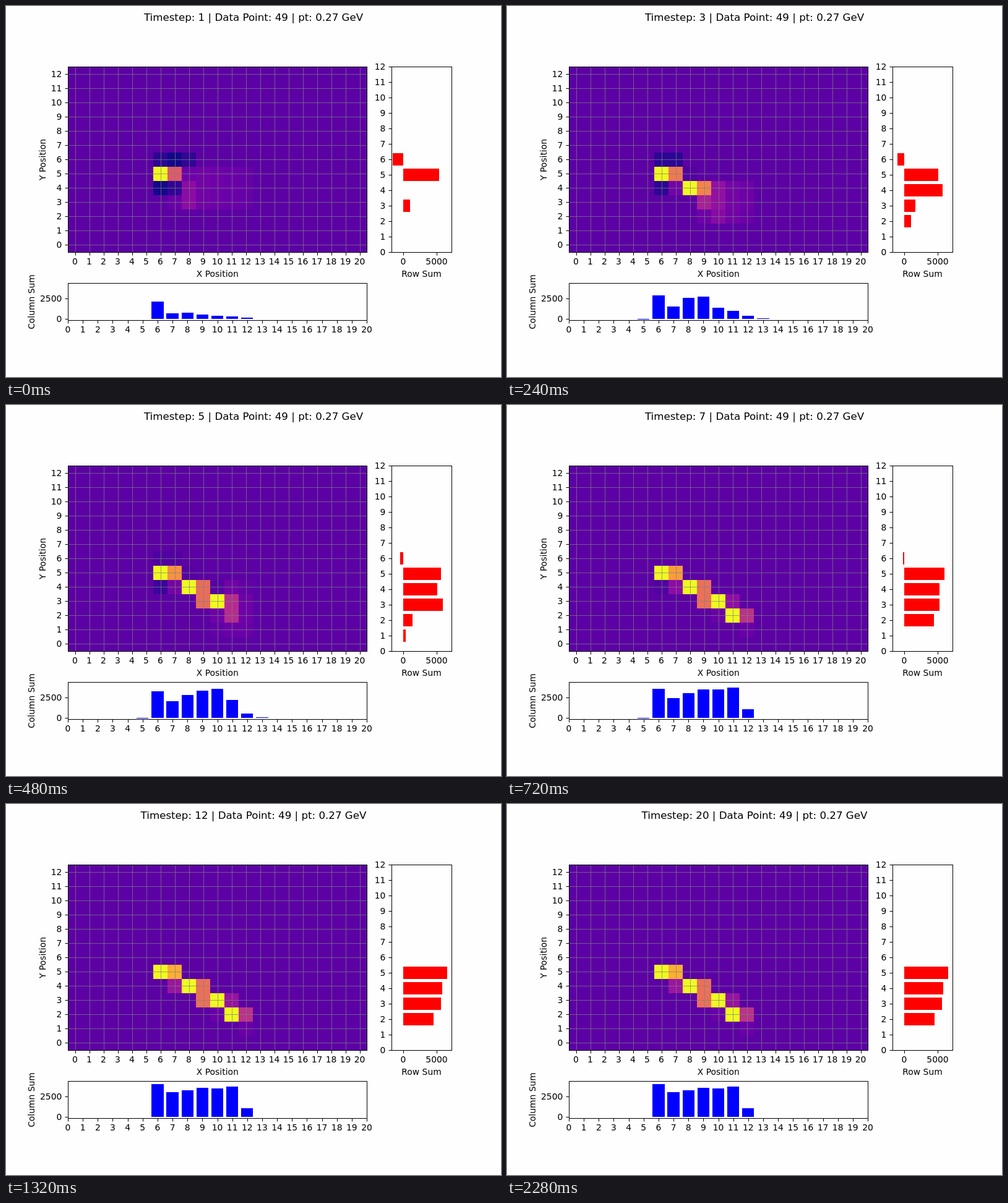
Animation of 800x600 px, one loop 2400 ms. Source, as an HTML page with a canvas:

```html
<!DOCTYPE html>
<html>
<head>
<meta charset="utf-8">
<style>
html, body { margin: 0; width: 800px; height: 600px; overflow: hidden; background: #fefefe; }
canvas { display: block; }
</style>
</head>
<body>
<canvas id="stage" width="800" height="600"></canvas>
<script>
const ctx = document.getElementById('stage').getContext('2d');
const STEP_MS = 120, STEPS = 20, BASE = 16.6;
const PLASMA = [
  [13, 8, 135], [65, 4, 157], [106, 0, 168], [143, 13, 164], [177, 42, 144], [204, 71, 120],
  [225, 100, 98], [242, 132, 75], [252, 166, 54], [252, 206, 37], [240, 249, 33]
];
const B = BASE;

// heat: row -> percent of the colour scale, from column 6 on
// cols: bar ends (y) of columns 5 to 13; rows: bar ends (x) of rows 1 to 6
const KEYS = [
  { step: 1,
    heat: { 6: [6, 1, 7], 5: [100, 57, 21, 22, 21, 20, 19], 4: [1, 7, 29, 22, 21, 20, 19], 3: [B, 20, 29, 22, 21, 20, 19] },
    cols: [506, 478, 497, 496, 499, 501, 502, 504, 506],
    rows: [642, 642, 653, 642, 700, 625] },
  { step: 3,
    heat: { 6: [6, 6], 5: [100, 67, 14], 4: [6, 22, 100, 70, 31, 23, 21], 3: [B, B, B, 37, 31, 23, 21], 2: [B, B, B, 21, 28, 22, 20] },
    cols: [507, 468, 486, 472, 470, 488, 493, 501, 505],
    rows: [642, 653, 660, 704, 697, 631] },
  { step: 5,
    heat: { 6: [13, 14], 5: [100, 74, 15], 4: [9, 23, 100, 63, 15, 22, 18], 3: [B, B, B, 63, 100, 41, 21], 2: [B, B, B, B, 21, 41, 21], 1: [B, B, B, B, 18, 20, 20] },
    cols: [507, 463, 479, 469, 462, 459, 477, 499, 505],
    rows: [646, 657, 706, 697, 703, 637] },
  { step: 7,
    heat: { 5: [100, 77], 4: [14, 29, 100, 64], 3: [B, B, B, 64, 100, 30], 2: [B, B, B, B, 20, 100, 43], 1: [B, B, B, B, B, B, 20] },
    cols: [507, 459, 474, 466, 460, 460, 457, 492, 506],
    rows: [642, 690, 699, 699, 707, 640] },
  { step: 12,
    heat: { 5: [100, 82], 4: [B, 33, 100, 64], 3: [B, B, B, 64, 100, 32], 2: [B, B, B, B, 20, 100, 43], 1: [B, B, B, B, B, B, 20] },
    cols: [506, 453, 466, 463, 459, 460, 457, 492, 506],
    rows: [642, 691, 703, 705, 713, 642] }
];

const mix = (a, b, u) => a + (b - a) * u;
const heatAt = (key, row, i) => key.heat[row]?.[i] ?? BASE;
const cellX = c => 100 + 23 * (c + 0.5);
const cellY = r => 397.9 - 23.04 * (r + 0.5);
const colX = c => 100 + 24.15 * c;
const rowY = r => 398 - 24.97 * r;

function plasma(percent) {
  const p = Math.min(9.999, Math.max(0, percent / 10)), i = Math.floor(p);
  return `rgb(${PLASMA[i].map((v, k) => Math.round(mix(v, PLASMA[i + 1][k], p - i)))})`;
}

// fills between two corners in any order, snapped to whole pixels
function box(x0, y0, x1, y1, color) {
  const [l, t, r, b] = [x0, y0, x1, y1].map(Math.round);
  ctx.fillStyle = color;
  ctx.fillRect(l, t, r - l, b - t);
}

function text(s, x, y, align = 'center', size = 13.89) {
  ctx.font = `${size}px "DejaVu Sans", sans-serif`;
  ctx.textAlign = align;
  ctx.fillStyle = '#000';
  ctx.fillText(s, x, y);
}

function sideText(s, x, y) {
  ctx.save();
  ctx.translate(x, y);
  ctx.rotate(-Math.PI / 2);
  text(s, 0, 0);
  ctx.restore();
}

function frame(x0, y0, x1, y1) {
  ctx.strokeStyle = '#000';
  ctx.strokeRect(x0 + 0.5, y0 + 0.5, x1 - x0, y1 - y0);
}

function xTick(label, x, y) {
  ctx.fillStyle = '#000';
  ctx.fillRect(Math.round(x), y + 0.5, 1, 5);
  text(label, x, y + 20);
}

function yTick(label, x, y) {
  ctx.fillStyle = '#000';
  ctx.fillRect(x - 4.5, Math.round(y), 5, 1);
  text(label, x - 9.7, Math.round(y) + 5, 'right');
}

function drawHeat(a, b, u) {
  box(100, 98, 583, 398, plasma(BASE));
  for (let r = 1; r <= 6; r++) {
    for (let i = 0; i < 7; i++) {
      const v = mix(heatAt(a, r, i), heatAt(b, r, i), u);
      const x = cellX(i + 6), y = cellY(r);
      box(x - 11.5, y - 11.52, x + 11.5, y + 11.52, plasma(v));
    }
  }
  ctx.fillStyle = 'rgba(128,128,128,0.69)';
  for (let c = 0; c <= 20; c++) ctx.fillRect(Math.round(cellX(c)), 98, 1, 300);
  for (let r = 0; r <= 12; r++) ctx.fillRect(100, Math.round(cellY(r)), 483, 1);
}

function drawAxes() {
  frame(100, 98, 583, 398);
  frame(100, 448, 583, 508);
  frame(623, 98, 720, 398);
  for (let c = 0; c <= 20; c++) {
    xTick(c, cellX(c), 398);
    xTick(c, colX(c), 508);
  }
  for (let r = 0; r <= 12; r++) {
    yTick(r, 100, cellY(r));
    yTick(r, 623, rowY(r));
  }
  yTick('0', 100, 506);
  yTick('2500', 100, 473);
  xTick('0', 642, 398);
  xTick('5000', 696, 398);
  text('X Position', 341.8, 438);
  text('Row Sum', 671.5, 438);
  sideText('Y Position', 64, 248.5);
  sideText('Column Sum', 46, 478.5);
}

function draw(step) {
  const n = KEYS.findIndex(k => k.step > step);
  const b = KEYS[n < 0 ? KEYS.length - 1 : n];
  const a = n < 0 ? b : KEYS[n - 1];
  let u = a === b ? 0 : (step - a.step) / (b.step - a.step);
  if (a.step === 7) u = 1 - (1 - u) ** 1.6; // settles slowly at the end

  box(0, 0, 800, 600, '#fefefe');
  drawHeat(a, b, u);
  a.cols.forEach((end, i) => {
    const x = colX(i + 5);
    box(x - 9.66, mix(end, b.cols[i], u), x + 9.66, 506, '#00f');
  });
  a.rows.forEach((end, i) => {
    const y = rowY(i + 1);
    box(642, y - 10, mix(end, b.rows[i], u), y + 10, '#f00');
  });
  drawAxes();
  text(`Timestep: ${step} | Data Point: 49 | pt: 0.27 GeV`, 400, 24, 'center', 16.67);
}

const start = performance.now();
function tick() {
  draw(Math.floor((performance.now() - start) / STEP_MS) % STEPS + 1);
  requestAnimationFrame(tick);
}
tick();
</script>
</body>
</html>
```
